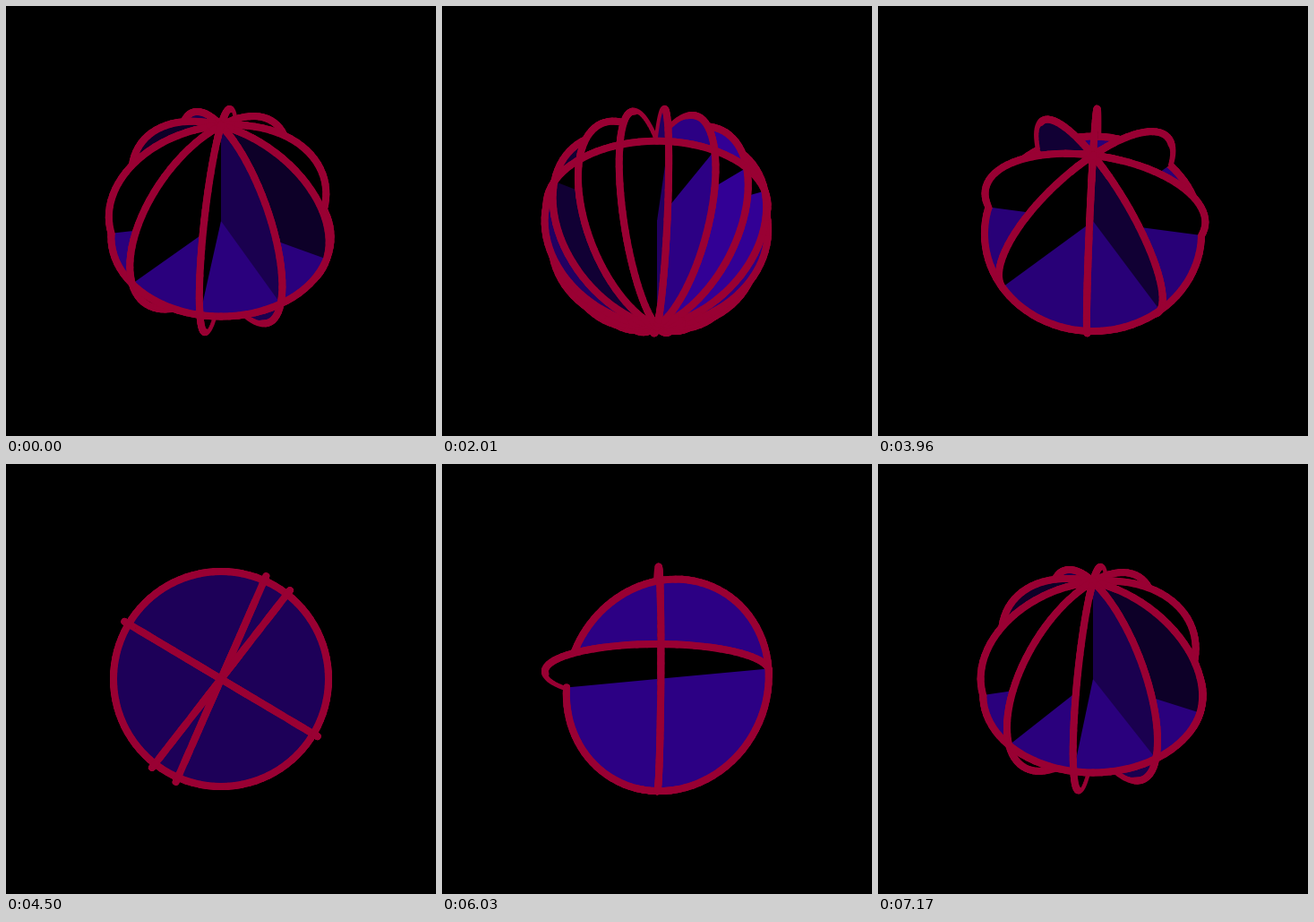
Recreate the animation shown at these times as an HTML page with a canvas. Size 480 by 480 pixels, loop 7.2 s.

```html
<!DOCTYPE html>
<html>
<head>
<meta charset="utf-8">
<style>
  html, body { margin: 0; width: 100%; height: 100%; overflow: hidden; background: #000; }
  canvas { display: block; }
</style>
</head>
<body>
<canvas id="stage" width="480" height="480"></canvas>
<script>
const ctx = document.getElementById('stage').getContext('2d');
const LOOP = 7200, STEP = 30, TAU = Math.PI * 2;
const RADIUS = 120, EYE = 240 * Math.sqrt(3), HALF_LINE = 4;
const LINE_BIAS = 0.0101;                 // lines sit about 1% nearer than the fills
const LIGHT = [-1, -1, 1].map(c => c / Math.sqrt(3));
const X = [1, 0, 0];

const dot = (a, b) => a[0] * b[0] + a[1] * b[1] + a[2] * b[2];
const mix = (a, p, b, q) => a.map((c, i) => c * p + b[i] * q);
const neg = a => a.map(c => -c);

function project(p) {
  const depth = (EYE - p[2]) / EYE;
  return { x: p[0] / depth, y: p[1] / depth, depth };
}

// Visible half width of a rim line that its own disc partly hides
function halfWidth(a, b, n) {
  const tx = b.x - a.x, ty = b.y - a.y, len = Math.hypot(tx, ty) || 1;
  let mx = -ty / len, my = tx / len;
  if (mx * a.x + my * a.y > 0) { mx = -mx; my = -my; }
  const slope = -(n[0] * mx + n[1] * my) / ((n[2] || 1e-9) * EYE);
  return slope > 0 ? Math.min(HALF_LINE, LINE_BIAS / a.depth / slope) : HALF_LINE;
}

function strokeRim(pts, n, count) {
  for (let i = 0; i < count; i++) {
    const a = pts[i], b = pts[i + 1], w = halfWidth(a, b, n);
    if (w < 0.3) continue;
    ctx.lineWidth = 2 * w;
    ctx.beginPath();
    ctx.moveTo(a.x, a.y);
    ctx.lineTo(b.x, b.y);
    ctx.stroke();
  }
}

// Sector of a disc sweeping from u towards v, lit on the side facing the eye
function drawSector(u, v, sweep, segments, normal) {
  const n = normal[2] < 0 ? neg(normal) : normal;
  const pts = [];
  for (let i = 0; i <= segments; i++) {
    const a = sweep * i / segments;
    pts.push(project(mix(u, RADIUS * Math.cos(a), v, RADIUS * Math.sin(a))));
  }
  const rim = new Path2D(), face = new Path2D();
  face.moveTo(0, 0);
  pts.forEach((p, i) => {
    i ? rim.lineTo(p.x, p.y) : rim.moveTo(p.x, p.y);
    face.lineTo(p.x, p.y);
  });
  ctx.lineWidth = 2 * HALF_LINE;
  ctx.stroke(rim);
  const lit = Math.max(0, dot(n, LIGHT));
  ctx.fillStyle = `rgb(${51 * lit}, 0, ${153 * lit})`;
  ctx.fill(face);
  strokeRim(pts, n, segments);
  return { pts, n };
}

function draw(t) {
  const tilt = TAU * (t + 1 / 8), c = Math.cos(tilt), s = Math.sin(tilt);
  const front = [0, s, c], pole = [0, -c, s];
  const near = s >= 0 ? pole : neg(pole);

  const n = 5 + 4 * Math.sin(TAU * t);
  const angles = [];
  for (let i = 0; i < n - 1e-9; i++) {
    const a = -Math.PI / 4 + (i + 1) * Math.PI / n;
    angles.push(a, a + Math.PI);
  }
  angles.sort((a, b) => (Math.cos(a) - Math.cos(b)) * c);

  const quarters = axis => angles.map(a => drawSector(
    axis, mix(X, Math.sin(a), front, Math.cos(a)), TAU / 4, 24,
    mix(X, Math.cos(a), front, -Math.sin(a))));

  ctx.setTransform(1, 0, 0, 1, 0, 0);
  ctx.fillStyle = '#000';
  ctx.fillRect(0, 0, 480, 480);
  ctx.translate(240, 240);
  ctx.strokeStyle = '#990033';
  ctx.lineCap = ctx.lineJoin = 'round';

  quarters(neg(near));
  drawSector(X, front, TAU, 96, pole);
  for (const q of quarters(near)) strokeRim(q.pts, q.n, 3);
}

function tick() {
  const ms = performance.now() % LOOP;
  draw(Math.floor(ms / STEP) * STEP / LOOP);
  requestAnimationFrame(tick);
}
tick();
</script>
</body>
</html>
```
